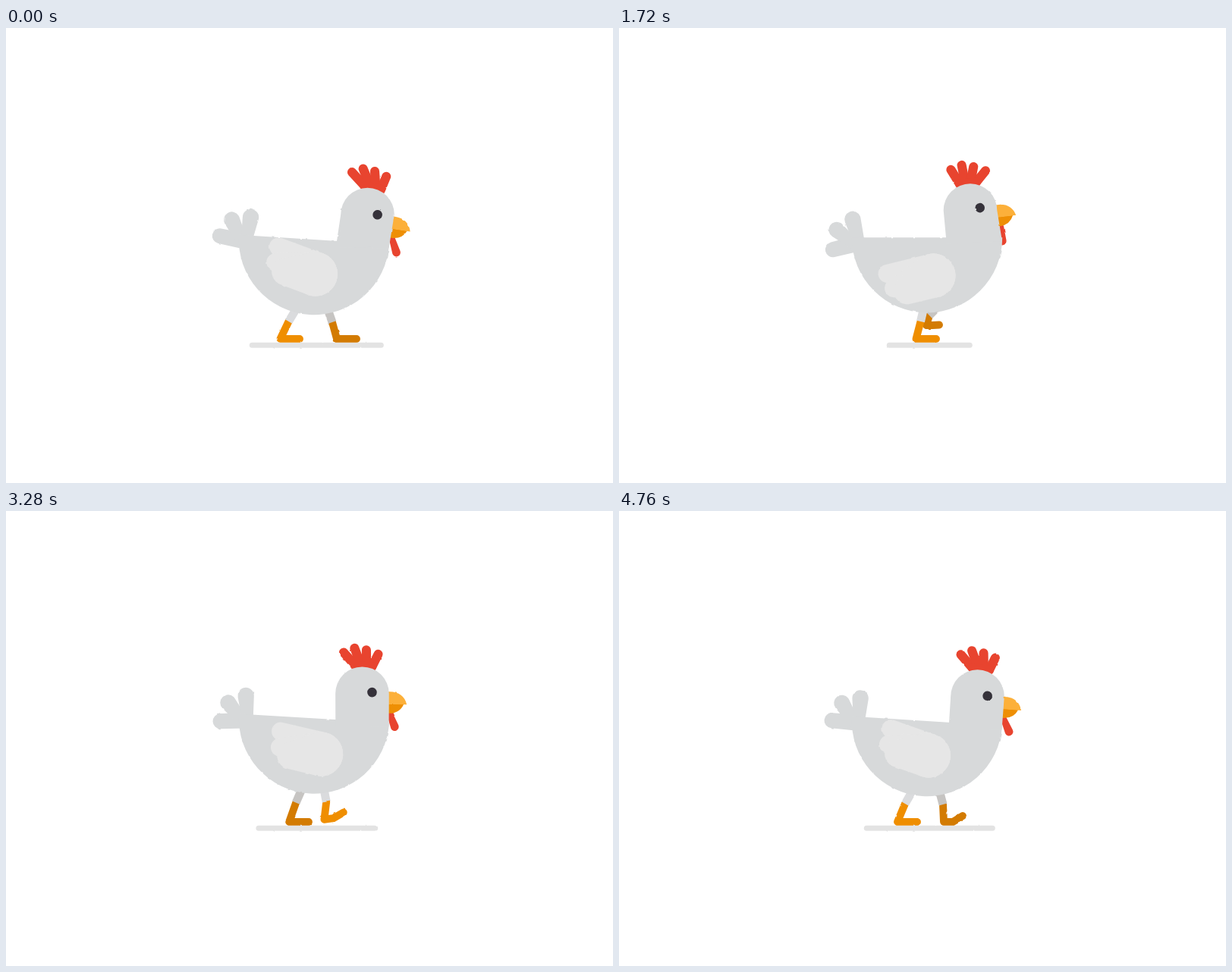
An HTML page with a canvas that plays this animation: 800x600 px, repeating every 4.8 s.

```html
<!DOCTYPE html>
<html lang="en">
<head>
<meta charset="utf-8">
<title>Walking hen</title>
<style>
  html, body { margin: 0; width: 100%; height: 100%; overflow: hidden; background: #fff; }
  canvas { display: block; filter: url(#rough); }
  svg { position: absolute; }
</style>
</head>
<body>
<svg width="0" height="0">
  <filter id="rough" x="0" y="0" width="100%" height="100%" color-interpolation-filters="sRGB">
    <feTurbulence type="fractalNoise" baseFrequency="0.14" numOctaves="1" seed="4"/>
    <feDisplacementMap in="SourceGraphic" scale="2.4" xChannelSelector="R" yChannelSelector="G"/>
  </filter>
</svg>
<canvas id="stage" width="800" height="600"></canvas>
<script>
const ctx = document.getElementById('stage').getContext('2d');
const LOOP = 4800, STEP = 40, HALF = 480, GROUND = 409.9;
const BODY_X = 406, BODY_R = 99.2;
const RED = '#e8442f', BODY = '#d7d9da';
const KEYS = [0, 40, 160, 280, 360, 440];

// The body repeats every step (6 keys), each leg every two steps (12 keys).
const hen = {
  bodyY:   [279, 280.5, 283, 276.2, 271, 277],
  lean:    [3.6, 3.6, 2, 0, 2.8, 3.6],
  neckX:   [436, 436, 435, 431, 433.5, 435],
  headX:   [476.5, 478.5, 474.5, 463, 467, 472.5],
  headY:   [246, 248.5, 248, 240.5, 237.5, 244.5],
  tilt:    [9, 10.5, 5, -7, -2.5, 5],
  comb:    [-87.5, -83.7, -83, -92.8, -93.7, -89],
  wattleX: [514.5, 513.5, 507.5, 505.2, 510, 514],
  wattleY: [296, 299.5, 297.5, 281, 279.5, 291],
  tailX:   [315.5, 314.5, 314.5, 314, 318, 314.5],
  tail:    [234.8, 242, 235, 209, 214.5, 228],
  wingX:   [408, 407, 412, 414.5, 422, 408],
  wingY:   [324.5, 326.5, 332, 326.5, 320, 322.5],
  wing:    [216.5, 216, 190.6, 182.4, 200.8, 215.5],
  shadow:  [88.5, 86, 63, 56.5, 71.5, 86.5]
};
const planted = Array(6).fill(GROUND);
const leg = {
  hipX:  [384, 387, 404, 420, 417, 422, 423, 421, 415.5, 402, 391.5, 387.5],
  sockX: [372.5, 378, 394, 409, 417, 427, 430, 427, 414.5, 397.5, 387.5, 377],
  sockY: [387, 385, 384, 379, 380, 387, 388, 388.5, 390, 387, 384, 386],
  heelX: [361.5, 365, 377, 405, 412, 428, 436, 430, 411, 391.5, 379.5, 367],
  heelY: [GROUND, 402, 391, 392, 402, GROUND, ...planted],
  ballX: [373, 371, 389, 413, 424, 440, 449, 443, 424, 404.5, 392, 380],
  ballY: [GROUND, GROUND, 395, 392, 399, GROUND, ...planted],
  toeX:  [387, 390, 402, 422, 437, 453, 462, 456, 436, 418, 405, 393],
  toeY:  [GROUND, GROUND, 398, 391.5, 395, 402, ...planted]
};

const rad = deg => deg * Math.PI / 180;
const polar = (x, y, r, deg) => [x + r * Math.cos(rad(deg)), y + r * Math.sin(rad(deg))];

// Smooth periodic curve through unevenly spaced keys.
function curve(values, time) {
  const n = values.length;
  const value = i => values[(i + n) % n];
  const when = i => KEYS[(i + 6) % 6] + HALF * Math.floor(i / 6);
  const rate = i => (value(i + 1) - value(i)) / (when(i + 1) - when(i));
  const slope = i => {
    const before = when(i) - when(i - 1), after = when(i + 1) - when(i);
    return (rate(i - 1) * after + rate(i) * before) / (before + after);
  };
  const t = time % (n * 80);
  let i = 0;
  while (when(i + 1) <= t) i++;
  const h = when(i + 1) - when(i), u = (t - when(i)) / h, v = 1 - u;
  return value(i) * v * v * (1 + 2 * u) + value(i + 1) * u * u * (3 - 2 * u)
    + h * u * v * (slope(i) * v - slope(i + 1) * u);
}

const pose = (rows, time) =>
  Object.fromEntries(Object.entries(rows).map(([name, values]) => [name, curve(values, time)]));

function fill(color, draw) {
  ctx.fillStyle = color;
  ctx.beginPath();
  draw();
  ctx.fill();
}

function line(color, width, points, cap = 'round') {
  ctx.strokeStyle = color;
  ctx.lineWidth = width;
  ctx.lineCap = cap;
  ctx.lineJoin = 'round';
  ctx.beginPath();
  points.forEach(p => ctx.lineTo(...p));
  ctx.stroke();
}

// Hull of two circles.
function taper(color, [x1, y1], r1, [x2, y2], r2) {
  const a = Math.atan2(y2 - y1, x2 - x1);
  const b = Math.acos((r1 - r2) / Math.hypot(x2 - x1, y2 - y1));
  fill(color, () => {
    ctx.arc(x1, y1, r1, a + b, a - b + 2 * Math.PI);
    ctx.arc(x2, y2, r2, a - b, a + b);
  });
}

function drawLeg(time, orange, grey) {
  const p = pose(leg, time), down = y => Math.min(y, GROUND);
  const sock = [p.sockX, p.sockY];
  line(orange, 9.9, [sock, [p.heelX, down(p.heelY)], [p.ballX, down(p.ballY)], [p.toeX, down(p.toeY)]]);
  line(grey, 11, [[p.hipX, 368], sock], 'butt');
}

function drawTail(p) {
  const x = p.tailX, y = p.bodyY - 92 * Math.sin(rad(p.lean)) + 5;
  taper(BODY, polar(x, y, 34, p.tail - 48), 10, [x, y + 3], 10.5);
  taper(BODY, polar(x, y, 31, p.tail), 10.5, [x - 4, y + 4], 7);
  taper(BODY, polar(x, y, 29.5, p.tail + 49), 10.7, [x + 2, y], 7.5);
}

function drawComb(p) {
  const root = k => polar(p.headX, p.headY, 38, p.tilt - 88 + k);
  const tips = [[59.5, -22.7], [60.7, -8], [57.7, 7], [56, 23.7]];
  tips.forEach(([r, a], i) =>
    line(RED, 12.1, [polar(p.headX, p.headY, r, p.comb + a), root(i * 34 / 3 - 17)]));
  line(RED, 12.1, [root(-17), root(17)]);
}

function inHead(p, draw) {
  ctx.save();
  ctx.translate(p.headX, p.headY);
  ctx.rotate(rad(p.tilt));
  draw();
  ctx.restore();
}

function drawBeak() {
  fill('#ee8f04', () => {
    ctx.moveTo(28, 13);
    ctx.lineTo(55, 13);
    ctx.quadraticCurveTo(50, 25, 36, 25.5);
    ctx.lineTo(28, 26);
  });
  fill('#fcb03a', () => {
    ctx.moveTo(28, -3);
    ctx.lineTo(36, -3);
    ctx.quadraticCurveTo(54.5, -3, 59, 13.5);
    ctx.lineTo(28, 13.5);
  });
}

function drawBody(p) {
  const lean = rad(p.lean);
  const backY = p.bodyY + (p.neckX - BODY_X) * Math.tan(lean);
  fill(BODY, () => ctx.arc(BODY_X, p.bodyY, BODY_R, lean, lean + Math.PI));
  fill(BODY, () => {
    ctx.arc(p.headX, p.headY, 35.3, Math.PI, 0);
    ctx.lineTo(...polar(BODY_X, p.bodyY, BODY_R, p.lean + 3));
    ctx.lineTo(p.neckX, backY + 8);
    ctx.lineTo(p.neckX, backY);
  });
}

function drawWing(p) {
  const feathers = [[61, 0, 12], [55, -20, 12], [40, -32, 18]];
  for (const [distance, turn, r] of feathers)
    taper('#e6e6e6', polar(p.wingX, p.wingY, distance, p.wing + turn), r, [p.wingX, p.wingY], 29);
}

function draw(time) {
  const p = pose(hen, time);
  ctx.clearRect(0, 0, 800, 600);
  line('#e3e3e3', 7, [[412.8 - p.shadow, 418.3], [405.8 + p.shadow, 418.3]]);
  drawLeg(time + HALF, '#d37b02', '#c6c4c2');
  drawLeg(time, '#ef8e00', '#dadbdd');
  taper(RED, [p.wattleX, p.wattleY], 5.4,
    polar(p.headX, p.headY, 46, p.tilt + 36), 4);
  drawComb(p);
  inHead(p, drawBeak);
  drawTail(p);
  drawBody(p);
  drawWing(p);
  inHead(p, () => fill('#35323a', () => ctx.arc(13, -1.8, 6.3, 0, 2 * Math.PI)));
}

function tick() {
  const time = performance.now() % LOOP;
  draw(Math.floor(time / STEP) * STEP);
  requestAnimationFrame(tick);
}
tick();
</script>
</body>
</html>
```
